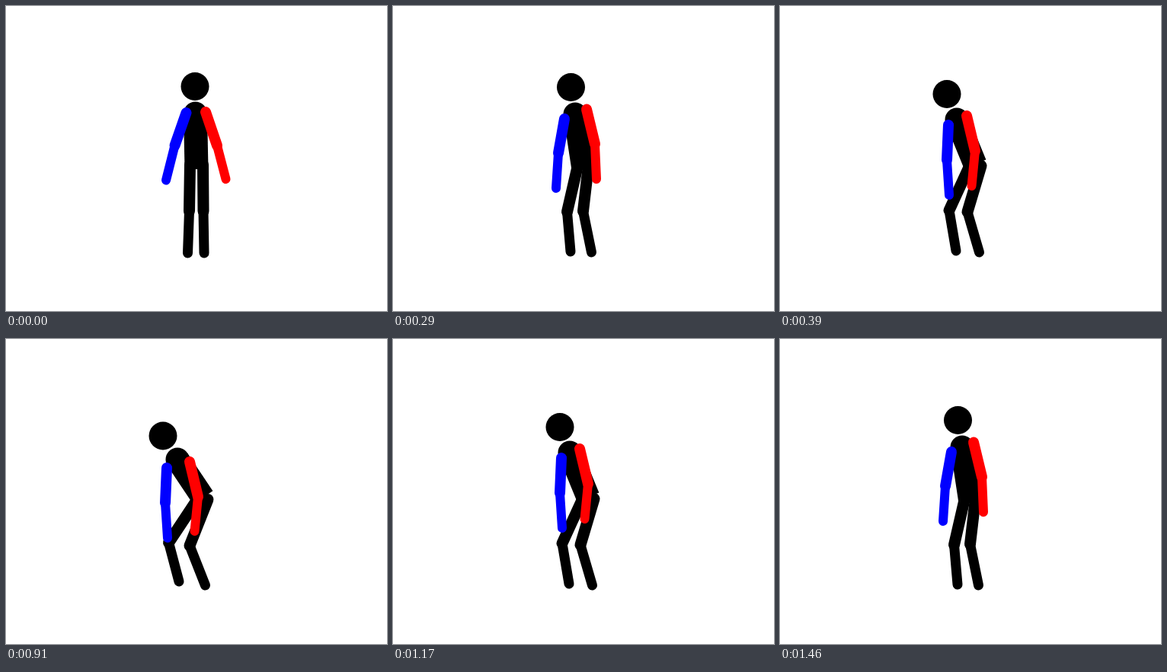
These frames come from a looping animation (500x400 px, 1.56 s). An HTML page with a canvas:

```html
<!DOCTYPE html>
<html lang="en">
<head>
<meta charset="utf-8">
<title>Bowing figure</title>
<style>
  html, body { margin: 0; width: 100%; height: 100%; overflow: hidden; background: #fff; }
  canvas { display: block; }
</style>
</head>
<body>
<canvas id="stage" width="500" height="400"></canvas>
<script>
const ctx = document.getElementById('stage').getContext('2d');
const TICK = 130;
const ORDER = [0, 1, 1, 2, 3, 3, 3, 3, 3, 2, 1, 1]; // pose held during each tick

// Joint positions from upright to fully bowed; limbs run from body to tip.
const POSES = [
  { head: [248, 105.5], spine: [[248.5, 141], [250, 214]],
    legs: [[[241.5, 208], [240.5, 269], [238.5, 324]], [[258.5, 208], [259, 269], [260, 324]]],
    blue: [[236.5, 140], [221.5, 183], [210, 228.5]],
    red: [[262, 139], [277, 183], [288.5, 227]] },
  { head: [233.5, 106.5], spine: [[239, 142], [249.5, 211]],
    legs: [[[243, 207], [228.5, 270], [233, 322]], [[256.5, 209], [249.5, 269], [260.5, 323]]],
    blue: [[225, 148], [217, 193], [214, 239]],
    red: [[254, 135.5], [265, 181], [267, 227]] },
  { head: [219, 115.5], spine: [[232, 149], [256, 207.5]],
    legs: [[[249.5, 208], [222, 268], [231, 321]], [[264, 209.5], [246, 270], [261.5, 323]]],
    blue: [[221, 156], [219, 202], [222, 248]],
    red: [[245, 144], [256, 190], [251.5, 236]] },
  { head: [206, 127], spine: [[225, 158], [258.5, 208]],
    legs: [[[252, 209], [213.5, 267], [227, 318]], [[265, 210.5], [241, 271], [261.5, 323]]],
    blue: [[211, 169], [209, 215], [212, 261]],
    red: [[241, 161], [252, 207], [247.5, 252]] }
];

function disc([x, y], r) {
  ctx.beginPath();
  ctx.arc(x, y, r, 0, 2 * Math.PI);
  ctx.fill();
}

function bar(from, to, width, color, cap = 'round') {
  ctx.strokeStyle = color;
  ctx.lineWidth = width;
  ctx.lineCap = cap;
  ctx.beginPath();
  ctx.moveTo(...from);
  ctx.lineTo(...to);
  ctx.stroke();
}

function limb([root, joint, tip], width, color) {
  bar(root, joint, width, color);
  bar(joint, tip, width - 2, color);
}

function draw({ head, spine: [neck, hip], legs, blue, red }) {
  ctx.fillStyle = '#fff';
  ctx.fillRect(0, 0, 500, 400);
  ctx.fillStyle = '#000';
  disc(head, 18.5);
  disc(neck, 15.5);
  bar(neck, hip, 31, '#000', 'butt');
  legs.forEach(leg => limb(leg, 15, '#000'));
  limb(blue, 14, '#00f');
  limb(red, 14, '#f00');
}

const start = performance.now();
function frame() {
  const tick = Math.floor((performance.now() - start) / TICK);
  draw(POSES[ORDER[tick % ORDER.length]]);
  requestAnimationFrame(frame);
}
frame();
</script>
</body>
</html>
```
